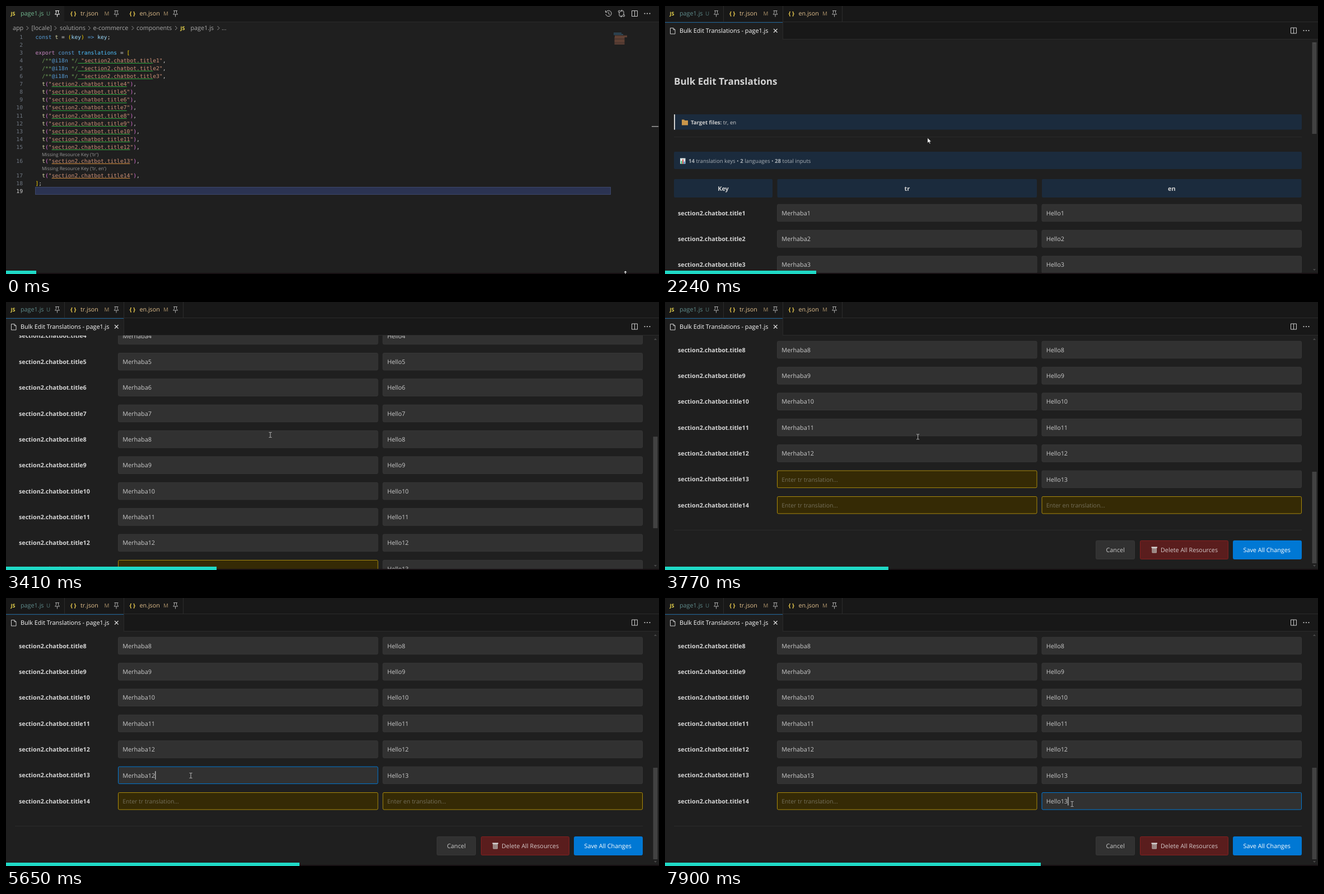
Write an HTML page that moves like this. It is 1166 px wide and 480 px high and loops after 7990 ms.

```html
<!DOCTYPE html>
<html lang="en">
<head>
<meta charset="utf-8">
<title>Bulk edit translations</title>
<style>
html, body { margin: 0; width: 100%; height: 100%; overflow: hidden; background: #1f1f1f; }
svg { display: block; width: 1166px; height: 480px; text-rendering: geometricPrecision; }
text { font-family: "Open Sans", "Noto Sans", sans-serif; white-space: pre; }
.code { font-family: "DejaVu Sans Mono", monospace; font-size: 9.68px; }
</style>
</head>
<body>
<svg id="stage" viewBox="0 0 1166 480"></svg>
<script>
const LOOP = 7990, STEPS = 89, TICK = LOOP / STEPS;
const stage = document.getElementById('stage');
const $ = id => document.getElementById(id);
const range = (a, b) => Array.from({ length: b - a + 1 }, (_, i) => a + i);

// Drawing helpers; text is placed by its vertical middle.
const box = (x, y, w, h, fill, more = '') =>
  `<rect x="${x}" y="${y}" width="${w}" height="${h}" fill="${fill}" ${more}/>`;
const line = (d, color, more = '') =>
  `<path d="${d}" fill="none" stroke="${color}" ${more}/>`;
const label = (x, y, str, fill = '#ccc', size = 10.8, more = '') =>
  `<text x="${x}" y="${(y + size * 0.36).toFixed(2)}" font-size="${size}" fill="${fill}" ${more}>${str}</text>`;
const span = (str, fill) => `<tspan fill="${fill}">${str}</tspan>`;
const strong = str => `<tspan font-weight="700">${str}</tspan>`;
const at = (x, y, body, more = '') => `<g transform="translate(${x} ${y})" ${more}>${body}</g>`;
const BOLD = 'font-weight="700"', MIDDLE = 'text-anchor="middle"';

// Icons
const pin = (x, color) => at(x, 13.5,
  line('M-3.5-5h7M-2-5v4l-2 2.5h8L2-1v-4M0 1.5v4.5', color));
const split = (x, y) => at(x, y, line('M-5-5h10v10h-10zM0-5v10', '#ccc'));
const dots = (x, y) => at(x, y, [-4.5, 0, 4.5].map(d => `<circle cx="${d}" r="1.1" fill="#ccc"/>`).join(''));
const chevron = x => line(`M${x - 2} 36l3.5 3.5-3.5 3.5`, '#999');
const js = (x, y) => label(x, y, 'JS', '#e8d44d', 9, BOLD);

function tabs() {
  const tab = (x, name, mark, markX, pinX) =>
    label(x, 13.5, '{ }', '#e8c84d', 10, BOLD) + label(x + 18, 13.5, name, '#e2c08d', 10.7) +
    label(markX, 13.5, mark, '#a98f68', 9.8) + pin(pinX, '#aaa');
  return box(0, 0, 1166, 28, '#181818') + box(0, 28, 1166, 1, '#2b2b2b') +
    box(0, 0, 104, 29, '#1f1f1f', 'id="activeTab"') +
    `<g id="tabLines">${[104, 210, 316].map(x => box(x, 0, 1, 28, '#2b2b2b')).join('')}</g>` +
    js(8.5, 14) +
    `<g id="pageTab">${label(26, 13.5, 'page1.js', 'currentColor', 10.8)}${label(72, 13.5, 'U', 'currentColor', 9.8, 'opacity=".8"')}</g>` +
    `<g id="pagePin" color="#fff">${pin(91.5, 'currentColor')}</g>` +
    tab(115, 'tr.json', 'M', 175.5, 197) + tab(220.5, 'en.json', 'M', 281, 302.5);
}

function crumbs() {
  const items = [[12, 'app'], [45.5, '[locale]'], [96, 'solutions'], [155.5, 'e-commerce'],
    [233, 'components'], [329.5, 'page1.js'], [385, '...']];
  return items.map(([x, s]) => label(x, 39.5, s, '#a9a9a9')).join('') +
    [38.5, 88.5, 149, 226.5, 304, 379.5].map(chevron).join('') + js(311.5, 39.5);
}

const rowY = n => n < 16 ? 55.7 + 14.05 * (n - 1) : [278, 303.2, 317.3, 331.3][n - 16];

function codeLine(n) {
  const blue = '#569cd6', plain = '#d4d4d4', gold = '#ffd700', key = '#9cdcfe', fn = '#dcdcaa';
  const text = body => `<text class="code" x="52.5" y="${rowY(n) + 3.3}" fill="${plain}">${body}</text>`;
  if (n === 1) return text(span('const ', blue) + span('t', fn) + ' = ' + span('(', gold) + span('key', key) +
    span(')', gold) + span(' =&gt; ', blue) + span('key', key) + ';');
  if (n === 3) return text(span('export ', '#c586c0') + span('const ', blue) + span('translations', '#4fc1ff') +
    ' = ' + span('[', gold));
  if (n === 18) return text(span(']', gold) + ';');
  if (n < 4 || n > 17) return '';
  const name = 'section2.chatbot.title' + (n - 3), note = n < 7;
  const start = 52.5 + (note ? 13 : 5) * 5.828;
  const rule = box(start, Math.round(rowY(n) + 4.4), name.length * 5.828, 1, n < 16 ? '#2fa83f' : '#d08a3c');
  const str = span(`"${name}"`, '#ce9178');
  return rule + text('  ' + (note
    ? span('/**', '#6a9955') + span('@i18n', blue) + span(' */ ', '#6a9955') + str + ','
    : span('t', fn) + span('(', '#da70d6') + str + span(')', '#da70d6') + ','));
}

function popup() {
  const link = '#4daafc';
  return `<g id="popup">` + box(181.5, 139.5, 148, 131, '#202020', 'stroke="#454545" rx="1.5"') +
    box(182, 248, 147, 1, '#3a3a3a') +
    label(188, 151, strong('KEY') + ': section2.chatbot.title13', '#ccc', 9.9) +
    '<circle cx="195" cy="172.5" r="1.7" fill="#ccc"/>' +
    label(205.5, 172, strong('en') + ': Hello13', '#ccc', 9.9) +
    label(188, 193.3, 'Edit/Add Translations', link, 9.9) +
    label(188, 214.5, 'Missing translations: tr', '#ccc', 9.9) +
    label(188, 236, 'Delete Translations', link, 9.9) +
    box(190.5, 256, 9, 10.5, '#a9744f', 'rx="1"') + box(192, 257.5, 6, 7.5, '#d8d2cc') + box(193, 255, 4, 2, '#888') +
    label(205, 261, 'Bulk Edit (14 keys)', link, 10) + '</g>';
}

function editor() {
  const lens = (y, s) => label(64, y, `Missing Resource Key ('${s}')`, '#999', 8.4);
  const numbers = range(1, 19).map(n =>
    `<text class="code" x="30" y="${rowY(n) + 3.3}" text-anchor="end" fill="${n === 19 ? '#ccc' : '#6e7681'}">${n}</text>`);
  const map = range(4, 17).map(n =>
    box(n < 7 ? 1087 : 1086.5, 48 + n * 1.17, n < 7 ? 22 : 18, 0.9, '#7d513f', 'opacity=".85"'));
  const history = at(1076, 13.5, line('M-4.5-3A5.2 5.2 0 1 1-5.2 1M-5.5-5.5v3.2h3.2M0-3V.5l2.5 1.5', '#ccc'));
  const compare = at(1099, 13.5,
    line('M-4-2v5q0 2 2 2h3M-1 3l2 2-2 2M4 2v-5q0-2-2-2h-3M1-7l-2 2 2 2', '#ccc') +
    '<g fill="none" stroke="#ccc"><circle cx="-4" cy="-3.7" r="1.7"/><circle cx="4" cy="3.7" r="1.7"/></g>');
  return `<g id="editor">` + crumbs() + history + compare + split(1122.5, 13.5) + dots(1145, 13.5) +
    box(52.5, 324.5, 1027, 13, '#2b3352', 'stroke="#3c4669"') +
    `<g id="hover">${box(52, 91, 1, 219, '#3d3d3d')}${box(1153, 48, 13, 262, '#3f3f3f')}</g>` +
    box(1153, 215, 12, 1.5, '#a0a0a0') +
    numbers.join('') + range(1, 18).map(codeLine).join('') +
    lens(266, 'tr') + lens(291, 'tr, en') +
    box(1085, 48.2, 14, 0.9, '#3f7698') + box(1085, 50.6, 17, 0.9, '#3f7698') + map.join('') +
    popup() + '</g>';
}

// Table page, laid out as it stands when scrolled to the end.
const MAX_SCROLL = 609.6, COLS = { tr: 200.5, en: 673 }, COL_W = 463.5;
const cellY = n => 364 - (14 - n) * 46.37;
const navy = '#1b2b3d';

function field(lang, n) {
  const x = COLS[lang], y = cellY(n);
  return `<g id="${lang}${n}">` + box(x, y - 15.5, COL_W, 30.5, '#313131', 'rx="2"') +
    box(x + 7.5, y - 8, 0, 15.5, '#1555b5') + label(x + 7.7, y, '') +
    box(0, y - 7.5, 1, 15, '#eee', 'visibility="hidden"') + '</g>';
}

function table() {
  const head = (x, w, s) => box(x, -299.5, w, 32.8, navy, 'rx="2"') +
    label(x + w / 2, -283, s, '#d4d4d4', 10.9, BOLD + ' ' + MIDDLE);
  const row = n => label(23, cellY(n), 'section2.chatbot.title' + n, '#d6d6d6', 10.7, BOLD) +
    field('tr', n) + field('en', n);
  const button = (x, w, s, tx, fill, edge, color) =>
    box(x + 0.5, 427.5, w - 1, 33, fill, `stroke="${edge}" rx="2"`) + label(tx, 444, s, color, 10.8);
  const trash = box(869.5, 440, 8.5, 9.5, '#b5aaa5', 'rx="1"') + box(868.5, 438.5, 10.5, 2, '#ddd') +
    line('M871.5 441.5v7M873.7 441.5v7M876 441.5v7', '#6a4444', 'stroke-width=".8"');
  return label(16, -475, 'Bulk Edit Translations', '#d4d4d4', 17, BOLD) +
    box(16, -415.5, 1121, 27.5, navy, 'rx="2"') + box(16, -415.5, 2, 27.5, '#d0d0d0') +
    '<path d="M30-406h4l1.5 1.5h5.5v8.5h-11z" fill="#c9964a"/>' +
    label(46, -401.5, strong('Target files:') + ' tr, en', '#ccc', 9.6) +
    box(16, -375.5, 1121, 1, '#2a2a2a') +
    box(16, -348.5, 1121, 31, navy, 'rx="2"') + box(27, -337, 9.5, 10, '#dce8e6') +
    box(28.5, -332, 2, 5, '#3bb36b') + box(31, -335, 2, 8, '#d35454') + box(33.5, -331, 2, 4, '#3b82c4') +
    label(42, -332, `${strong('14')} translation keys • ${strong('2')} languages • ${strong('28')} total inputs`, '#a9b0b6', 9.6) +
    head(16, 176, 'Key') + head(COLS.tr, COL_W, 'tr') + head(COLS.en, COL_W, 'en') +
    range(1, 14).map(row).join('') + box(16, 408, 1121, 1, '#2b2b2b') +
    button(769, 70, 'Cancel', 787.5, '#313131', '#373737', '#ccc') +
    button(848, 158, 'Delete All Resources', 885, '#5a1d1d', '#842020', '#d6cccc') + trash +
    button(1014, 123, 'Save All Changes', 1032.5, '#0078d4', '#0078d4', '#fff');
}

function bulkPage() {
  return `<g id="bulk">` + box(0, 29, 1166, 31, '#181818') + box(0, 59, 1166, 1, '#2b2b2b') +
    box(0, 29, 210, 31, '#1f1f1f') + box(0, 29, 210, 1, '#1a5f94') + box(210, 29, 1, 30, '#2b2b2b') +
    line('M9.5 39.5h5.5l3 3v7.5h-8.5zM15 39.5v3h3', '#ccc') +
    label(26, 44.5, 'Bulk Edit Translations - page1.js', '#fff') +
    line('M194 41l6.5 6.5M200.5 41l-6.5 6.5', '#ddd', 'stroke-width="1.2"') +
    split(1122.5, 44) + dots(1145, 44) +
    `<g clip-path="url(#view)"><g id="sheet">${table()}</g></g>` +
    box(1155.5, 65, 8, 164, '#424242', 'id="thumb"') +
    '<path d="M1157 68h5l-2.5-3zM1157 471h5l-2.5 3z" fill="#4a4a4a"/></g>';
}

const cursors = {
  arrow: '<path d="M0 0v9.5l2.3-2 1.6 3.5 1.6-.7-1.6-3.4h3z" fill="#fff" stroke="#111" stroke-width=".7"/>',
  beam: line('M-2.5-4.5h2l.5.5.5-.5h2M0-4v8M-2.5 4.5h2l.5-.5.5.5h2', '#c8c8c8', 'stroke-width=".9"'),
  hand: '<path d="M-1.5-3.5q1-1.2 2 0v4l4 1q1.5.5 1.3 2.5l-.8 5h-6l-3-5q0-1.5 1.5-.5l1 .8z" fill="#fff" stroke="#111" stroke-width=".8"/>',
  size: '<path d="M0-4l3 3.5h-2.2v4.5h2.2l-3 3.5-3-3.5h2.2v-4.5h-2.2z" fill="#fff" stroke="#111" stroke-width=".6"/>'
};

stage.innerHTML = '<clipPath id="view"><rect y="60" width="1166" height="420"/></clipPath>' +
  box(0, 0, 1166, 480, '#1f1f1f') + tabs() + editor() + bulkPage() +
  box(0, 478, 1166, 2, '#160f12') + box(0, 474, 0, 6, '#1fd9c6', 'id="bar"') +
  '<g id="mouse"><circle id="press" r="7.3" fill="#d9b01c" opacity=".8"/>' +
  Object.keys(cursors).map(k => `<g id="${k}">${cursors[k]}</g>`).join('') + '</g>';

// Timeline
const OPEN = 1790;
const progress = [[0, 54], [1436, 189], [2963, 342], [3411, 376], [4668, 456], [6643, 592], [7900, 671]];
const scroll = [[2690, 0], [2962, 132], [3411, 449], [3680, MAX_SCROLL]];
const path = [
  [0, 1106, 478, 'size'], [150, 1106, 478, 'arrow'], [600, 569, 331, 'beam'], [950, 205, 279, 'beam'],
  [1170, 205, 279, 'beam'], [1350, 226, 268, 'hand'], [1790, 226, 268, 'arrow'], [2300, 477, 235, 'arrow'],
  [2970, 477, 235, 'arrow'], [3050, 472, 238, 'beam'], [3700, 472, 238, 'beam'], [4060, 268, 272, 'beam'],
  [4500, 194.5, 278.5, 'arrow'], [4750, 194.5, 278.5, 'arrow'], [5150, 330, 318, 'beam'], [6000, 330, 318, 'beam'],
  [6400, 730.5, 316, 'beam'], [6750, 730.5, 316, 'beam'], [7050, 672, 320, 'beam'], [7250, 672, 320, 'beam'],
  [7540, 727, 369, 'beam']
];
const presses = [[1620, 1780], [4070, 4500], [5170, 5330], [6600, 7050], [7550, 7720]];
const focus = [[0, ''], [4070, 'tr12'], [5170, 'tr13'], [6600, 'en13'], [7550, 'en14']];
const typed = {
  tr13: [[0, ''], [5480, 'Merhaba12'], [5750, 'Merhaba1'], [5930, 'Merhaba13']],
  tr14: [[0, '']],
  en14: [[0, ''], [7720, 'Hello13']]
};
const drags = { tr12: [4070, 4500], en13: [6750, 7050] };

const latest = (list, t) => list.filter(k => k[0] <= t).pop() || list[0];
function lerp(keys, t, col = 1, ease = u => u) {
  const a = latest(keys, t), b = keys[keys.indexOf(a) + 1];
  if (!b || t <= a[0]) return a[col];
  return a[col] + (b[col] - a[col]) * ease((t - a[0]) / (b[0] - a[0]));
}
const smooth = u => u * u * (3 - 2 * u);
const mouseAt = t => [1, 2].map(c => lerp(path, t, c, smooth));
const show = (id, on) => $(id).setAttribute('visibility', on ? 'visible' : 'hidden');

function drawField(lang, n, t) {
  const id = lang + n, x = COLS[lang] + 7.7;
  const [frame, mark, text, caret] = $(id).children;
  const value = typed[id] ? latest(typed[id], t)[1] : (lang === 'tr' ? 'Merhaba' : 'Hello') + n;
  const active = latest(focus, t)[1] === id;
  frame.setAttribute('fill', value ? '#313131' : '#352a05');
  frame.setAttribute('stroke', active ? '#0078d4' : value ? '#373737' : '#a98a0c');
  text.textContent = value || `Enter ${lang} translation...`;
  text.setAttribute('fill', value ? '#ccc' : '#75705c');
  text.setAttribute('font-size', value ? 10.8 : 10.5);
  const end = x + (value ? text.getComputedTextLength() : 0);
  const drag = drags[id];
  const from = active && drag && t >= drag[0] ? Math.max(x, mouseAt(Math.min(t, drag[1]))[0]) : end;
  const width = Math.max(0, end - from);
  mark.setAttribute('x', end - width);
  mark.setAttribute('width', width);
  caret.setAttribute('x', end + 0.3);
  caret.setAttribute('visibility', active && !width ? 'inherit' : 'hidden');
}

function draw(t) {
  const bulk = t >= OPEN;
  $('editor').style.display = bulk ? 'none' : '';
  $('bulk').style.display = bulk ? '' : 'none';
  show('activeTab', !bulk);
  $('pageTab').setAttribute('color', bulk ? '#5f8c8c' : '#73b991');
  $('pagePin').setAttribute('color', bulk ? '#aaa' : '#fff');
  show('popup', t >= 1170);
  show('hover', t >= 600);
  show('tabLines', t >= 600);
  $('bar').setAttribute('width', lerp(progress, t));

  const top = lerp(scroll, t);
  $('sheet').setAttribute('transform', `translate(0 ${MAX_SCROLL - top})`);
  $('thumb').setAttribute('y', 65 + top * 239 / MAX_SCROLL);
  for (const n of range(1, 14)) { drawField('tr', n, t); drawField('en', n, t); }

  const [x, y] = mouseAt(t), kind = latest(path, t)[3];
  $('mouse').setAttribute('transform', `translate(${x} ${y})`);
  for (const k in cursors) $(k).style.display = k === kind ? '' : 'none';
  $('press').style.display = presses.some(([a, b]) => t >= a && t < b) ? '' : 'none';
}

const began = performance.now();
let shown = -1;
function loop() {
  const now = Math.max(0, performance.now() - began) % LOOP;
  const step = Math.min(STEPS - 1, Math.floor((now + 10) / TICK));
  if (step !== shown) draw((shown = step) * TICK);
  requestAnimationFrame(loop);
}
loop();
</script>
</body>
</html>
```
